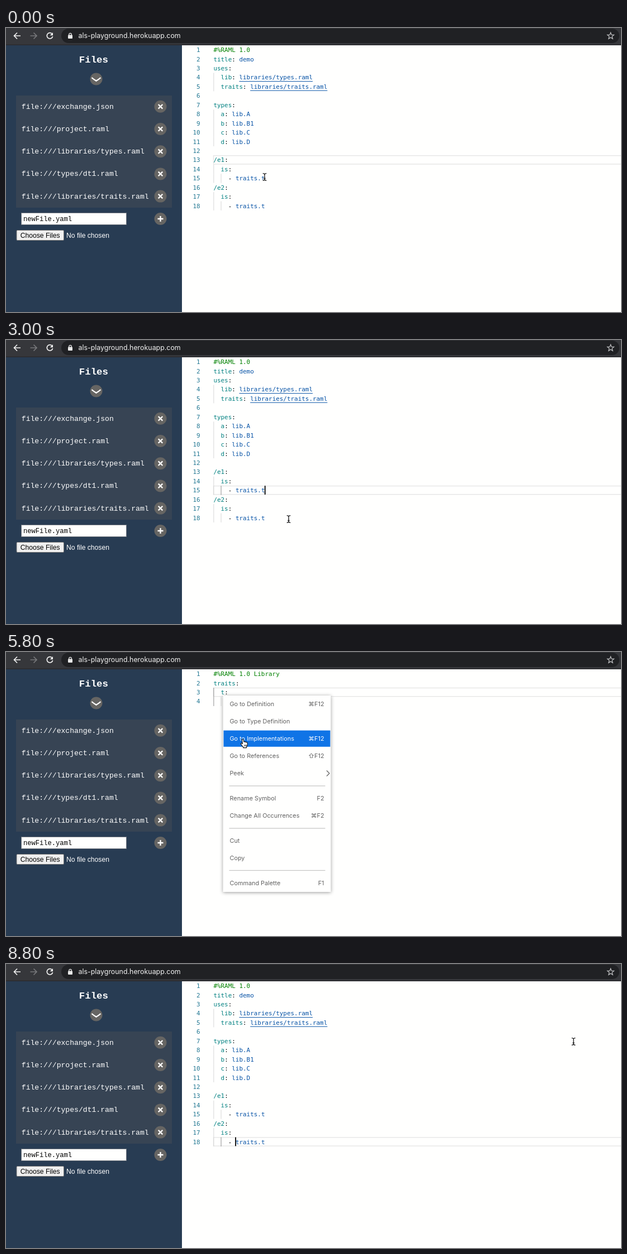
Animation of 1101 by 509 pixels, one loop 9 s. Source, as an HTML page:

```html
<!DOCTYPE html>
<html lang="en">
<head>
<meta charset="utf-8">
<title>Editor playground</title>
<style>
html, body { margin: 0; width: 100%; height: 100%; overflow: hidden; background: #fffffe; }
svg { display: block; width: 100vw; height: 100vh; }
text { white-space: pre; }
.ui { font-family: Inter, Roboto, sans-serif; }
.form { font: 12.15px "Liberation Sans", Arial, sans-serif; }
.mono { font-family: "Liberation Mono", "Courier New", monospace; }
.code { font: 10.93px "DejaVu Sans Mono", Menlo, monospace; }
.menu { font-size: 10.85px; }
.head { font-size: 11.6px; }
.list { font-size: 13.4px; fill: #616161; }
</style>
</head>
<body>
<svg id="stage" viewBox="0 0 1101 509" preserveAspectRatio="none">
  <g id="frame"></g>
  <g id="editor"></g>
  <g id="pointer"></g>
</svg>
<script>
const LOOP = 9000, STEP = 200;
const CODE_X = 371.4, CHAR_W = 6.58, TOP = 31.2, LINE_H = 16.43;
const PEEK_SHIFT = 43.9, REST_SHIFT = 295.7;
const KEY = '#008080', VALUE = '#0451a5', COMMENT = '#008000', INK = '#000';

const PROJECT = `#%RAML 1.0
title: demo
uses:
  lib: libraries/types.raml
  traits: libraries/traits.raml

types:
  a: lib.A
  b: lib.B1
  c: lib.C
  d: lib.D

/e1:
  is:
    - traits.t
/e2:
  is:
    - traits.t`.split('\n');

const LIBRARY = `#%RAML 1.0 Library
traits:
  t:
    description: demo trait`.split('\n');

const FILES = ['exchange.json', 'project.raml', 'libraries/types.raml',
  'types/dt1.raml', 'libraries/traits.raml'];

// label, shortcut, offset of the row centre; no label means a separator
const MENU = [
  ['Go to Definition', '⌘F12', 15], ['Go to Type Definition', '', 46],
  ['Go to Implementations', '⌘F12', 77], ['Go to References', '⇧F12', 108],
  ['Peek', '', 139], ['', '', 162],
  ['Rename Symbol', 'F2', 184], ['Change All Occurrences', '⌘F2', 215], ['', '', 238],
  ['Cut', '', 260], ['Copy', '', 291], ['', '', 313.5],
  ['Command Palette', 'F1', 336]
];

// time, x, y
const PATH = [
  [0, 463, 267], [800, 463, 267], [1600, 501, 345], [2600, 501, 345],
  [3000, 506, 321], [3400, 150, 302], [3600, 389, 80], [3800, 401, 92],
  [4200, 389, 78], [4400, 389, 78], [5200, 419, 146], [5600, 426, 163],
  [6800, 426, 165], [7400, 426, 165], [8400, 1016, 139], [9000, 1016, 139]
];

const byId = id => document.getElementById(id);
const rect = (x, y, w, h, fill, extra = '') =>
  `<rect x="${x}" y="${y}" width="${w}" height="${h}" fill="${fill}" ${extra}/>`;
const line = (d, stroke, width = 1, extra = '') =>
  `<path d="${d}" fill="none" stroke="${stroke}" stroke-width="${width}" ${extra}/>`;
const text = (x, y, s, cls, fill, extra = '') =>
  `<text x="${x}" y="${y}" class="${cls}" fill="${fill}" ${extra}>${s}</text>`;
const badge = (x, y, d) =>
  `<circle cx="${x}" cy="${y}" r="11" fill="#666563"/>` +
  `<g transform="translate(${x} ${y})">${line(d, '#fff', 2.3)}</g>`;

const lineTop = n => TOP + (n - 1) * LINE_H;
const colX = c => CODE_X + c * CHAR_W;
const indentOf = s => s.length - s.trimStart().length;

function browserBar() {
  return rect(0, 0, 1101, 31, '#36373b') + rect(0, 29.5, 1101, 1.5, '#2a2b2e') +
    rect(99, 1, 999, 26, '#202124', 'rx="13"') +
    line('M26 14H15M20 8.5L14.5 14L20 19.5', '#f1f1f1', 1.7) +
    line('M43.500 14H54.500M49.500 8.500L55 14L49.500 19.500', '#77787b', 1.7) +
    line('M82.300 10.200A5.200 5.200 0 1 0 83.600 15', '#f1f1f1', 1.7) +
    '<path d="M84 8v5.300h-5.300z" fill="#f1f1f1"/>' +
    rect(111, 12.5, 8, 6.5, '#e8e8e8', 'rx="1"') +
    line('M112.800 13V11.500a2.200 2.200 0 0 1 4.400 0V13', '#e8e8e8', 1.3) +
    text(129.5, 18.4, 'als-playground.herokuapp.com', 'ui', '#f1f1f1', 'font-size="12.4"') +
    line(starPath(1082.5, 14.3, 6.2, 2.7), '#c4c5c7', 1.2);
}

function starPath(cx, cy, outer, inner) {
  const pts = Array.from({ length: 10 }, (_, i) => {
    const r = i % 2 ? inner : outer, a = i * Math.PI / 5 - Math.PI / 2;
    return `${(cx + r * Math.cos(a)).toFixed(2)} ${(cy + r * Math.sin(a)).toFixed(2)}`;
  });
  return `M${pts.join('L')}Z`;
}

function sidebar() {
  const rows = FILES.map((name, i) => {
    const y = 140.8 + i * 40.2;
    return text(27.8, y + 3.9, 'file:///' + name, 'mono', '#fff', 'font-size="13.1"') +
      badge(276.5, y, 'M-3.800 -3.800L3.800 3.800M3.800 -3.800L-3.800 3.800');
  }).join('');
  return rect(0, 31, 315, 478, '#283c53') + rect(18, 121, 279, 201, '#374454') +
    text(130.8, 61.5, 'Files', 'mono', '#fff', 'font-size="17.4" font-weight="700"') +
    badge(161.5, 91.5, 'M-8 -2.500Q-4 1 0 3.300Q4 1 8 -2.500') + rows +
    rect(27.5, 331.5, 188, 21, '#fffffe', 'stroke="#777c83"') +
    text(31, 346, 'newFile.yaml', 'mono', '#000', 'font-size="12.1"') +
    badge(276.5, 342, 'M-5 0H5M0 -5V5') +
    rect(19, 362.5, 84.5, 18, '#efefef', 'stroke="#767676" rx="1.5"') +
    text(25.7, 376, 'Choose Files', 'form', '#000') +
    text(108, 376, 'No file chosen', 'form', '#fff');
}

// Splits a source line into [column, string, colour] parts
function tokens(s) {
  const start = indentOf(s), body = s.trim();
  if (!body) return [];
  if (body[0] === '#') return [[start, body, COMMENT]];
  if (body[0] === '-') return [[start, '-', INK], [start + 2, body.slice(2), VALUE]];
  const colon = s.indexOf(':');
  const parts = [[start, s.slice(start, colon), KEY], [colon, ':', INK]];
  if (colon + 2 < s.length) parts.push([colon + 2, s.slice(colon + 2), VALUE]);
  return parts;
}

function isActiveGuide(lines, n, active, depth) {
  if (!active || depth !== indentOf(lines[active - 1]) / 2 - 1) return false;
  const from = Math.min(n, active), to = Math.max(n, active);
  return lines.slice(from - 1, to).every(s => indentOf(s) > depth * 2);
}

function codeLine(lines, n, active, shift = 0) {
  const s = lines[n - 1], top = lineTop(n) + shift, base = top + 12;
  let out = text(347.6, base, n, 'code', '#237893', 'text-anchor="end"');
  for (let d = 0; d < indentOf(s) / 2; d++) {
    const on = isActiveGuide(lines, n, active, d);
    out += rect(371.4 + d * 2 * CHAR_W, top, 1, LINE_H, on ? '#8f8f8f' : '#d6d6d6');
  }
  for (const [col, str, fill] of tokens(s)) {
    out += text(colX(col), base, str, 'code', fill);
    if (str.startsWith('libraries/'))
      out += rect(colX(col), top + 14.7, str.length * CHAR_W, 1, VALUE);
  }
  return out;
}

function lineBox(n, right, shift = 0) {
  return rect(371.5, lineTop(n) + shift + .4, right - 371.5, LINE_H - 1.2, 'none', 'stroke="#e6e6e6" stroke-width="1.4"');
}

function caret([n, col]) {
  return rect(colX(col) - .7, lineTop(n), 1.8, LINE_H - .6, '#000');
}

function contextMenu([x, y], hover) {
  let row = -1;
  const items = MENU.map(([label, keys, dy]) => {
    const cy = y + dy;
    if (!label) return rect(x + 11, cy - .6, 172, 1.2, '#c4c4c4');
    row++;
    const on = row === hover, fill = on ? '#fff' : '#616161';
    return (on ? rect(x + 1, cy - 14.4, 191, 29.2, '#1074e6') : '') +
      text(x + 12, cy + 4, label, 'ui menu', fill) +
      (keys ? text(x + 181, cy + 4, keys, 'ui menu', fill, 'text-anchor="end"') : '') +
      (label === 'Peek' ? line(`M${x + 185.5} ${cy - 4.500}l5 5l-5 5`, '#616161', 1.2) : '');
  }).join('');
  return rect(x, y, 193, 352, '#fffffe', 'style="filter:drop-shadow(0 1px 3px #999)"') + items;
}

function peek(choice) {
  const active = choice ? 18 : 15;
  const mark = n => rect(colX(6), lineTop(n) + PEEK_SHIFT + .6, 8 * CHAR_W, LINE_H - 1.2, '#f4da3a');
  let out = rect(315, 86, 786, 287, '#fffffe') +
    '<path d="M385.500 86.500L391.500 80L397.500 86.500Z" fill="#1a82c4"/>' +
    rect(315, 85.7, 786, 1.3, '#1a82c4') +
    text(333, 101.7, 'project.raml', 'ui head', '#333') +
    text(403.8, 101.7, '/', 'ui head', '#777') +
    text(411.8, 101.7, '-', 'ui head', '#222') +
    text(420.7, 101.7, 'Implementations (2)', 'ui head', '#111') +
    rect(315, 108, 614, 264, '#f2f8fc') + rect(929, 108, 172, 264, '#f3f3f3') +
    rect(315, 107, 786, 1, '#8fbfe0') +
    lineBox(active, 917, PEEK_SHIFT) + mark(15) + mark(18);
  for (let n = 3; n <= 18; n++) out += codeLine(PROJECT, n, active, PEEK_SHIFT);
  out += rect(917, 137, 12, 234, '#b9babb') + rect(917, 311.6, 12, 1.8, '#4a4a4a') +
    rect(929, 108 + choice * 21.4, 172, 21.4, '#cfe2f5');
  for (let i = 0; i < 2; i++) {
    const y = 118.4 + i * 21.4;
    out += rect(967, y - 8, 42.5, 16, '#efbfa9') +
      text(956.8, y + 4.5, '-', 'ui list', '#616161') +
      text(967, y + 4.5, 'traits.t', 'ui list', '#616161');
  }
  return out + rect(315, 371.9, 786, 1.3, '#1a82c4');
}

function pointerAt(t) {
  const i = Math.max(1, PATH.findIndex(p => p[0] > t));
  const [t0, x0, y0] = PATH[i - 1], [t1, x1, y1] = PATH[i];
  const k = (t - t0) / (t1 - t0), e = k * k * (3 - 2 * k);
  return [x0 + (x1 - x0) * e, y0 + (y1 - y0) * e];
}

function drawPointer(x, y, hand) {
  const shape = hand
    ? '<path d="M-3.500-6.500q1.500-1.500 2.500.5l1 4q1.500-1 2.300.3 1.500-.8 2.200.5 1.600-.4 1.700 1.400v3.200q-.4 2-1.600 3.600v1.500h-6v-1.500q-2.600-2.400-4-5.200-.6-1.800 1.200-1.600l1.600 1.300z" fill="#fff" stroke="#111" stroke-width="1.100" stroke-linejoin="round"/>' +
      line('M.8 3v3.200M2.600 3v3.200M4.300 3v3.200', '#111', .8)
    : ['#fff', '#111'].map((c, i) =>
      line('M-3.300-6.300Q-.5-6.300 0-4.800Q.5-6.300 3.300-6.300M0-4.800V4.800M-3.300 6.300Q-.5 6.300 0 4.800Q.5 6.300 3.300 6.300M-1.600 2.500H1.600', c, i ? 1.3 : 3)).join('');
  return `<g transform="translate(${x.toFixed(1)} ${y.toFixed(1)})">${shape}</g>`;
}

function stateAt(t) {
  const within = (a, b) => t >= a && t < b;
  const library = within(3400, 8800);
  return {
    lines: library ? LIBRARY : PROJECT,
    active: library ? 3 : t < 400 ? 13 : t < 3400 ? 15 : 18,
    menu: within(800, 2600) ? [461.5, 268] : within(4400, 6200) ? [388.5, 78] : null,
    peek: within(6400, 8800),
    choice: t >= 8600 ? 1 : 0,
    caret: within(2600, 3400) ? [15, 14] : t >= 8800 ? [18, 6] : null
  };
}

function render(t) {
  const s = stateAt(t), [x, y] = pointerAt(t);
  const hover = s.menu ? Math.floor((y - 7 - s.menu[1] - .5) / 31.1) : -1;
  let out = lineBox(s.active, 1102);
  s.lines.forEach((_, i) => {
    out += codeLine(s.lines, i + 1, s.active, s.peek && i > 2 ? REST_SHIFT : 0);
  });
  if (s.caret) out += caret(s.caret);
  if (s.peek) out += peek(s.choice);
  if (s.menu) out += contextMenu(s.menu, hover);
  byId('editor').innerHTML = out;
  const hand = hover >= 0 || x < 315 || (s.peek && x > 929);
  byId('pointer').innerHTML = drawPointer(x, y, hand);
}

byId('frame').innerHTML = rect(0, 0, 1101, 509, '#fffffe') + browserBar() + sidebar();

const begin = performance.now();
let shown = -1;
function tick() {
  const t = Math.floor((performance.now() - begin) % LOOP / STEP) * STEP;
  if (t !== shown) render(shown = t);
  requestAnimationFrame(tick);
}
tick();
</script>
</body>
</html>
```
